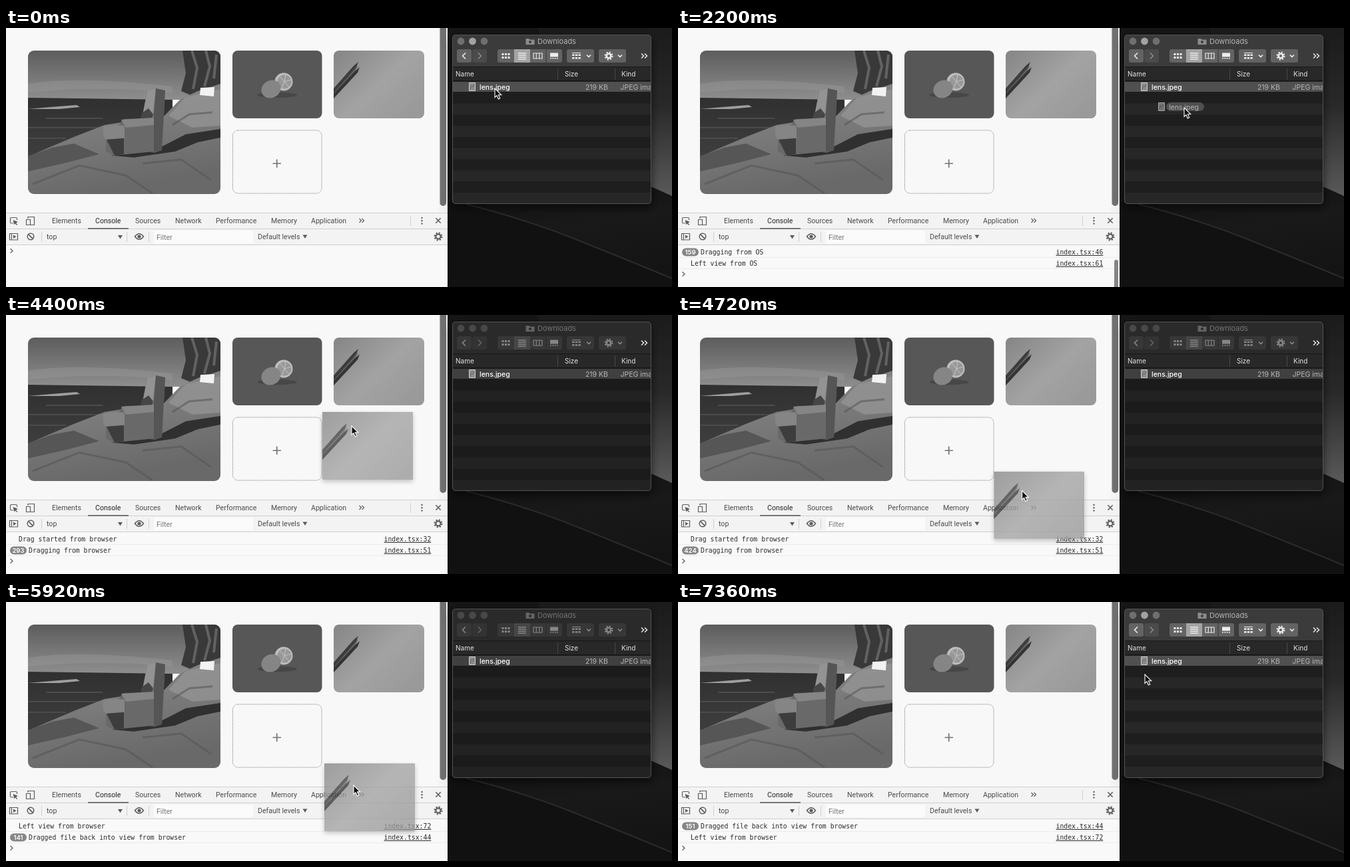
An HTML page that plays this animation: 1000 px wide and 390 px high, repeating every 7520 ms.

```html
<!DOCTYPE html>
<html lang="en">
<head>
<meta charset="utf-8">
<title>Drag and drop log</title>
<style>
  html, body { margin: 0; width: 100%; height: 100%; overflow: hidden; background: #f8f8f8; }
  svg { display: block; }
  text { white-space: pre; }
  .ui { font: 10.6px Roboto, sans-serif; fill: #4a4a4a; }
  .mono { font: 9.8px "DejaVu Sans Mono", monospace; fill: #2b2b2b; }
  .icon { fill: none; stroke: #5c5c5c; stroke-width: 1.2; }
  .link { text-decoration: underline; }
  .count { font: 600 9.6px Inter, sans-serif; fill: #fff; text-anchor: middle; }
  #finder { --bar: #3b3b3b; --btn: #636363; --off: #4b4b4b; --on: #a4a4a4; --ink: #ececec; --dim: #8b8b8b;
            --title: #b4b4b4; --row: #505050; --odd: #1e1e1e; --even: #272727; --light: #a2a2a2; --dot: #6f6f6f; }
  #finder.idle { --bar: #2a2a2a; --btn: #373737; --off: #333; --on: #464646; --ink: #868686; --dim: #646464;
            --title: #747474; --row: #404040; --odd: #1b1b1b; --even: #222; --light: #484848; --dot: #484848; }
  .finder-text { font: 10.5px Inter, sans-serif; fill: #e4e4e4; }
  .ink { fill: none; stroke: var(--ink); stroke-width: 1.6; }
  .solid { fill: var(--ink); }
</style>
</head>
<body>
<svg width="100%" height="100%" viewBox="0 0 1000 390">
  <defs>
    <linearGradient id="sky" x2="0" y2="1"><stop stop-color="#5d5d5d"/><stop offset="1" stop-color="#8e8e8e"/></linearGradient>
    <linearGradient id="sea" x2="0" y2="1"><stop stop-color="#303030"/><stop offset="1" stop-color="#3f3f3f"/></linearGradient>
    <linearGradient id="rock" x2=".3" y2="1"><stop stop-color="#8c8c8c"/><stop offset="1" stop-color="#696969"/></linearGradient>
    <linearGradient id="paper" x2="1" y2=".8"><stop stop-color="#858585"/><stop offset=".55" stop-color="#a3a3a3"/><stop offset="1" stop-color="#999"/></linearGradient>
    <linearGradient id="night" x2="0" y2="1"><stop stop-color="#1b1b1b"/><stop offset=".3" stop-color="#292929"/><stop offset=".65" stop-color="#5a5a5a"/></linearGradient>
    <linearGradient id="dune" x2=".3" y2="1"><stop stop-color="#101010"/><stop offset=".5" stop-color="#191919"/><stop offset="1" stop-color="#141414"/></linearGradient>
    <clipPath id="frame1"><rect x="33" y="34" width="289" height="216" rx="9"/></clipPath>
    <clipPath id="frame3"><rect width="136" height="102" rx="8"/></clipPath>
    <clipPath id="square"><rect width="136" height="102"/></clipPath>
    <clipPath id="window"><rect x="670" y="10" width="299" height="255" rx="5"/></clipPath>
    <filter id="shade" x="-20%" y="-20%" width="140%" height="150%"><feDropShadow dx="0" dy="3" stdDeviation="3.5" flood-opacity=".28"/></filter>
    <filter id="glow" x="-20%" y="-20%" width="140%" height="140%"><feDropShadow dx="0" dy="5" stdDeviation="7" flood-opacity=".6"/></filter>
    <g id="pencils">
      <rect width="136" height="102" fill="url(#paper)"/>
      <path d="M0 62 37 22 32 32 0 69Z" fill="#636363"/>
      <path d="M0 57 30 23 37 17 34 25 0 64Z" fill="#3c3c3c"/>
      <path d="M0 65 32 31 39 25 36 33 0 72Z" fill="#343434"/>
    </g>
    <g id="file">
      <path d="M.5.5H9.5V12.5H.5Z" fill="#8b8b8b" stroke="#cfcfcf"/>
      <path d="M2 10 4 5 6 7 8 3" fill="none" stroke="#666"/>
    </g>
  </defs>

  <!-- Page -->
  <rect width="663" height="390" fill="#f8f8f8"/>
  <g clip-path="url(#frame1)">
    <path d="M33 34H322V108H33Z" fill="url(#sky)"/>
    <path d="M33 84Q110 72 250 88V98Q150 86 33 97Z" fill="#989898" opacity=".45"/>
    <path d="M33 105 250 108V200H33Z" fill="url(#sea)"/>
    <path d="M33 122 80 118 106 116 111 119 80 122Z" fill="#9f9f9f"/>
    <path d="M33 150H140M60 136H145M33 166H90" stroke="#4b4b4b" stroke-width="2"/>
    <path d="M265 34H322V96L284 104 263 95 270 68Z" fill="#393939"/>
    <path d="M279 34 287 60 281 92M300 34 306 58 298 88M316 40 312 76" fill="none" stroke="#626262" stroke-width="4"/>
    <path d="M33 194 62 181 102 164 148 146 238 132 262 107 288 95 322 84V250H33Z" fill="url(#rock)"/>
    <path d="M33 193 70 180 102 174 140 190 90 203 33 216Z" fill="#565656"/>
    <path d="M244 132 270 104 322 92V147L280 150Z" fill="#989898" opacity=".7"/>
    <path d="M158 192 235 178 270 160 322 152V165L288 172 254 186 192 195Z" fill="#303030"/>
    <path d="M40 235 110 207 180 222 220 249M205 204 263 198 308 229M250 146 275 130 310 127" fill="none" stroke="#555" stroke-width="3" opacity=".55"/>
    <path d="M292 90 313 89 312 103 291 101Z" fill="#f2f2f2"/>
    <path d="M212 95 225 91 239 94 234 184 222 188 203 160 204 136Z" fill="#6d6d6d"/>
    <path d="M212 95 225 91 219 147 203 155 204 137Z" fill="#939393"/>
    <path d="M225 91 239 94 234 184 218 188Z" fill="#555"/>
    <path d="M204 128 214 121 221 130 218 141 201 142Z" fill="#464646"/>
    <path d="M172 143Q173 137 180 137L222 136V186L162 192 150 186V166Z" fill="#696969"/>
    <path d="M146 149Q152 145 178 147L178 166 150 168Q144 164 146 149Z" fill="#858585"/>
    <path d="M173 138 222 135V146L180 150Z" fill="#858585"/>
    <path d="M151 168 177 166V190L163 192Z" fill="#3d3d3d"/>
  </g>
  <rect x="340" y="34" width="134.500" height="102" rx="8" fill="#575757"/>
  <ellipse cx="407" cy="101" rx="30" ry="4" fill="#474747"/>
  <circle cx="417" cy="81" r="13.500" fill="#bdbdbd"/>
  <circle cx="418" cy="81" r="10.500" fill="#989898"/>
  <path d="M418 81 411 73M418 81 420 70.500M418 81 428 78M418 81 425 89M418 81 414 91" stroke="#c4c4c4"/>
  <ellipse cx="398" cy="92" rx="15" ry="13" transform="rotate(-30 398 92)" fill="#858585"/>
  <g transform="translate(492 34)"><g clip-path="url(#frame3)"><use href="#pencils"/></g></g>
  <rect x="340.500" y="154" width="133.500" height="95" rx="8" fill="none" stroke="#7c7c7c" stroke-dasharray="1.300 1.300"/>
  <path d="M400.500 204H413M406.700 197.700V210.300" stroke="#737373" stroke-width="1.700"/>
  <path d="M649.500 0H663V278H649.500Z" fill="#f3f3f3"/>
  <rect x="651.500" y="-8" width="9.500" height="276" rx="4.700" fill="#707070"/>

  <!-- Developer tools -->
  <path d="M0 278H663V327H0Z" fill="#f3f3f3"/>
  <path d="M0 278.500H663M0 302.500H663M0 326.500H663M607.500 283V298M181.500 307V322M53.500 307V322M214.500 307V322" stroke="#cfcfcf"/>
  <path d="M123 302H184" stroke="#505050" stroke-width="1.500"/>
  <rect x="222" y="305" width="149" height="19" fill="#fbfbfb"/>
  <g class="ui" id="tabs">
    <text x="61" y="318">top</text>
    <text x="226" y="318.500" style="fill:#777">Filter</text>
    <text x="378" y="318">Default levels</text>
  </g>
  <path d="M168 312H175L171.500 317.500ZM445.500 311.500H452.500L449 317Z" fill="#5c5c5c"/>
  <g class="icon">
    <path d="M11 294H8Q6.500 294 6.500 292.500V287Q6.500 285.500 8 285.500H15Q16.500 285.500 16.500 287V289"/>
    <path d="M10.500 289 18 292 15 293.500 17.500 296.500 16.500 297 14 294.500 12.500 296.500Z" fill="#5c5c5c" stroke="none"/>
    <path d="M33 287V284.500H42.500V296.500H37M30.500 288.500H36.500V296.500H30.500Z"/>
    <path d="M530.500 287 533.500 290 530.500 293M534.500 287 537.500 290 534.500 293"/>
    <path d="M645.300 286.300 652.700 293.700M652.700 286.300 645.300 293.700" stroke-width="1.500"/>
    <path d="M5.500 309.500H17.500V319H5.500ZM8.500 309.500V319"/>
    <path d="M11 311.500 15.500 314.300 11 317Z" fill="#5c5c5c" stroke="none"/>
    <circle cx="37" cy="314" r="4.800" stroke-width="1.500"/><path d="M33.600 310.600 40.400 317.400" stroke-width="1.500"/>
    <path d="M193.500 314Q200 305.500 206.500 314Q200 322.500 193.500 314Z" stroke-width="1.500"/>
    <circle cx="200" cy="314" r="2" fill="#5c5c5c"/>
    <circle cx="649" cy="314" r="3.600" stroke-width="2.200"/>
    <circle cx="649" cy="314" r="5.500" stroke-width="2" stroke-dasharray="2.160"/>
  </g>
  <g fill="#5c5c5c"><circle cx="624.500" cy="286" r="1.200"/><circle cx="624.500" cy="290.300" r="1.200"/><circle cx="624.500" cy="294.600" r="1.200"/></g>
  <path d="M0 327H663V390H0Z" fill="#f9f9f9"/>
  <g id="console"></g>
  <path id="prompt" d="M6.500-3.200 10 0 6.500 3.200" fill="none" stroke="#5f5f5f" stroke-width="1.300"/>
  <rect id="thumb" x="655" width="6" height="60" rx="3" fill="#858585"/>

  <!-- Desktop -->
  <path d="M663 0H1000V390H663Z" fill="url(#night)"/>
  <path d="M663 0H800V270H663Z" fill="#161616"/>
  <path d="M663 262H820L969 239 1000 253V390H663Z" fill="url(#dune)"/>
  <path d="M690 265Q780 288 850 316T1000 377V390H663V262Z" fill="#111"/>
  <path d="M690 265Q780 288 850 316T1000 377" fill="none" stroke="#2b2b2b" stroke-width="2"/>

  <!-- File window -->
  <g id="finder">
    <rect x="670" y="10" width="299" height="255" rx="5" fill="#222" filter="url(#glow)"/>
    <g clip-path="url(#window)">
      <path d="M670 10H969V59H670Z" fill="var(--bar)"/>
      <path d="M670 59H969V80H670Z" fill="#282828"/>
      <g id="stripes"></g>
      <path d="M670 58.500H969M670 79.500H969" stroke="#171717"/>
      <path d="M828.500 61V78M914.500 61V78" stroke="#484848"/>
      <circle cx="683" cy="20" r="5.400" fill="var(--dot)"/><circle cx="700.500" cy="20" r="5.400" fill="var(--light)"/><circle cx="718" cy="20" r="5.400" fill="var(--dot)"/>
      <path d="M780.500 16H785L786.500 17.500H793.500V25H780.500Z" fill="var(--dim)"/>
      <circle cx="787" cy="21" r="2" fill="var(--bar)"/>
      <text class="finder-text" x="798" y="24" style="font-size:11px;fill:var(--title)">Downloads</text>
      <g fill="var(--btn)">
        <rect x="677" y="32" width="22" height="20" rx="3"/><rect x="738" y="32" width="97" height="20" rx="3"/>
        <rect x="842" y="32" width="41" height="20" rx="3"/><rect x="890" y="32" width="41" height="20" rx="3"/>
      </g>
      <rect x="700" y="32" width="22" height="20" rx="3" fill="var(--off)"/>
      <path d="M763 32H787V52H763Z" fill="var(--on)"/>
      <path d="M811 32V52" stroke="var(--bar)"/>
      <path d="M690 37.500 685.500 42 690 46.500M769 38H781M769 41H781M769 44H781M769 47H781M872 40.500 875 43.500 878 40.500M919 40.500 922 43.500 925 40.500" class="ink"/>
      <path d="M709 37.500 713.500 42 709 46.500" fill="none" stroke="var(--dim)" stroke-width="1.500"/>
      <path d="M792 38H805V46H792ZM796.300 38V46M800.700 38V46" class="ink" style="stroke-width:1.200"/>
      <path d="M744.500 38h3v3h-3zm4.500 0h3v3h-3zm4.500 0h3v3h-3zm-9 5h3v3h-3zm4.500 0h3v3h-3zm4.500 0h3v3h-3zM817 37.500h12v6h-12zm0 7.500h2v1.500h-2zm3.300 0h2v1.500h-2zm3.300 0h2v1.500h-2zm3.300 0h2v1.500h-2zM850 37h13v1h-13zm0 2.500h3.500v2.500H850zm4.700 0h3.500v2.500h-3.500zm4.700 0h3.500v2.500h-3.500zM850 44h3.500v2.500H850zm4.700 0h3.500v2.500h-3.500zm4.700 0h3.500v2.500h-3.500z" class="solid"/>
      <circle cx="905" cy="42" r="3.300" class="ink" style="stroke-width:2.600"/>
      <circle cx="905" cy="42" r="5.500" class="ink" style="stroke-width:2;stroke-dasharray:2.160"/>
      <path d="M954 38.500 957.500 42 954 45.500M959 38.500 962.500 42 959 45.500" fill="none" stroke="#e6e6e6" stroke-width="1.500"/>
      <g class="finder-text">
        <text x="675" y="72.500" style="font-size:10px">Name</text>
        <text x="839" y="72.500" style="font-size:10px">Size</text>
        <text x="924" y="72.500" style="font-size:10px">Kind</text>
        <text x="711" y="92.500" style="fill:#fff;font-weight:500">lens.jpeg</text>
        <text x="904" y="92.500" text-anchor="end" style="fill:#b5b5b5">219 KB</text>
        <text x="922.500" y="92.500" style="fill:#b5b5b5">JPEG image</text>
      </g>
      <use href="#file" x="695" y="82"/>
    </g>
    <rect x="670.500" y="10.500" width="298" height="254" rx="5" fill="none" stroke="#545454"/>
  </g>

  <!-- Dragged things and pointer -->
  <g id="chip" opacity=".75">
    <use href="#file" x="-39" y="-8"/>
    <rect x="-27" y="-8" width="57" height="13" rx="6.500" fill="#5e5e5e"/>
    <text class="finder-text" x="-23" y="2.500">lens.jpeg</text>
  </g>
  <g id="ghost" opacity=".78"><g filter="url(#shade)"><g clip-path="url(#square)"><use href="#pencils"/></g></g></g>
  <path id="pointer" d="M0 0V13.500L3 10.700 5.300 16 7.700 15 5.400 9.800H9.700Z" fill="#0c0c0c" stroke="#fff" stroke-width="1.100"/>
</svg>
<script>
const LOOP = 7520, STEP = 40, RATE = 0.41;
const $ = id => document.getElementById(id);

// [ms, x, y]
const POINTER = [
  [40, 734, 91], [80, 734, 89], [240, 734, 89], [400, 695, 125], [600, 640, 160], [900, 440, 200],
  [1040, 440, 200], [1240, 650, 185], [1400, 754, 165], [1480, 754, 165], [1640, 650, 180],
  [1840, 500, 195], [1920, 500, 195], [2080, 655, 155], [2200, 760, 120], [2280, 762, 117],
  [2480, 735, 100], [2560, 725, 98], [2880, 560, 70], [3080, 538, 64], [3320, 538, 64], [3400, 538, 65],
  [3680, 538, 65], [4040, 546, 142], [4400, 519, 167], [4800, 516, 289], [5120, 511, 312],
  [5400, 511, 312], [5576, 521, 250], [5680, 524, 172], [5760, 524, 172], [5920, 522, 276],
  [6080, 517, 304], [6280, 515, 332], [6640, 516, 332], [7000, 640, 190], [7240, 700, 112], [7360, 701, 109]
];
// [ms, x, y, scale]
const GHOST = [
  [3720, 494, 66, 1], [4040, 500, 113, 1], [4400, 475, 146, 1], [4800, 474, 258, 1], [4960, 474, 275, 1],
  [5120, 474, 289, .836], [5400, 474, 289, .836], [5576, 477, 219, 1], [5680, 480, 141, 1],
  [5760, 480, 141, 1], [5920, 478, 243, 1], [6080, 481, 281, .87], [6280, 478, 309, .836]
];
// [ms, message, line, highest count]
const LOG = [
  [600, 'Dragging from OS', 46, 254], [1250, 'Left view from OS', 61, 1],
  [1660, 'Dragging from OS', 46, 159], [2080, 'Left view from OS', 61, 1],
  [3687, 'Drag started from browser', 32, 1], [3687, 'Dragging from browser', 51, 484],
  [4870, 'Left view from browser', 72, 1], [5577, 'Dragged file back into view from browser', 44, 151],
  [5950, 'Left view from browser', 72, 1]
];
// [from, to, top]
const THUMB = [[1660, 2540, 349], [3687, 4000, 358], [4870, 5480, 366]];

const TABS = { Elements: 69, Console: 134, Sources: 194, Network: 254, Performance: 315, Memory: 398, Application: 458 };
$('tabs').innerHTML += Object.entries(TABS).map(([name, x]) =>
  `<text x="${x}" y="294"${name === 'Console' ? ' style="fill:#222"' : ''}>${name}</text>`).join('');

$('stripes').innerHTML = Array.from({ length: 11 }, (_, i) =>
  `<rect x="670" y="${80 + i * 16.8}" width="299" height="17" fill="var(${i ? i % 2 ? '--odd' : '--even' : '--odd'})"/>`
).join('') + '<rect x="670" y="81" width="299" height="15" fill="var(--row)"/>';

function sample(keys, t) {
  const i = keys.findIndex(k => k[0] > t);
  if (i === 0) return keys[0].slice(1);
  if (i < 0) return keys[keys.length - 1].slice(1);
  const a = keys[i - 1], b = keys[i], p = (t - a[0]) / (b[0] - a[0]);
  return a.slice(1).map((v, j) => v + (b[j + 1] - v) * p);
}

function logRow([start, message, line, max], i, t) {
  const y = 341 + i * 17;
  const count = Math.min(max, Math.floor((t - start) * RATE) + 1);
  const width = 7 + 6 * String(count).length;
  const badge = count > 1
    ? `<rect x="6" y="${y - 9.5}" width="${width}" height="12" rx="6" fill="#868686"/>
       <text class="count" x="${6 + width / 2}" y="${y}">${count}</text>` : '';
  return `${badge}<text class="mono" x="${count > 1 ? 9 + width : 19}" y="${y}">${message}</text>
    <text class="mono link" x="567.500" y="${y}">index.tsx:${line}</text>
    <path d="M0 ${y + 4.5}H663" stroke="#ebebeb"/>`;
}

function show(el, visible) { el.style.display = visible ? '' : 'none'; }

function draw(t) {
  const [x, y] = sample(POINTER, t);
  $('pointer').setAttribute('transform', `translate(${x} ${y})`);
  $('chip').setAttribute('transform', `translate(${x} ${y})`);
  show($('chip'), t >= 320 && t < 2440);

  const [gx, gy, scale] = sample(GHOST, t);
  $('ghost').setAttribute('transform', `translate(${gx} ${gy}) scale(${scale})`);
  show($('ghost'), t >= 3720 && t < 6440);

  const rows = LOG.filter(entry => entry[0] <= t).slice(-2);
  $('console').innerHTML = rows.map((entry, i) => logRow(entry, i, t)).join('');
  $('prompt').setAttribute('transform', `translate(0 ${335.5 + rows.length * 17.5})`);

  const thumb = THUMB.find(([from, to]) => t >= from && t < to);
  show($('thumb'), thumb);
  if (thumb) $('thumb').setAttribute('y', thumb[2]);
  $('finder').classList.toggle('idle', t >= 3080 && t < 7280);
}

const begin = performance.now();
function tick() {
  const t = (performance.now() - begin) % LOOP;
  draw(Math.floor(t / STEP) * STEP);
  requestAnimationFrame(tick);
}
tick();
</script>
</body>
</html>
```
